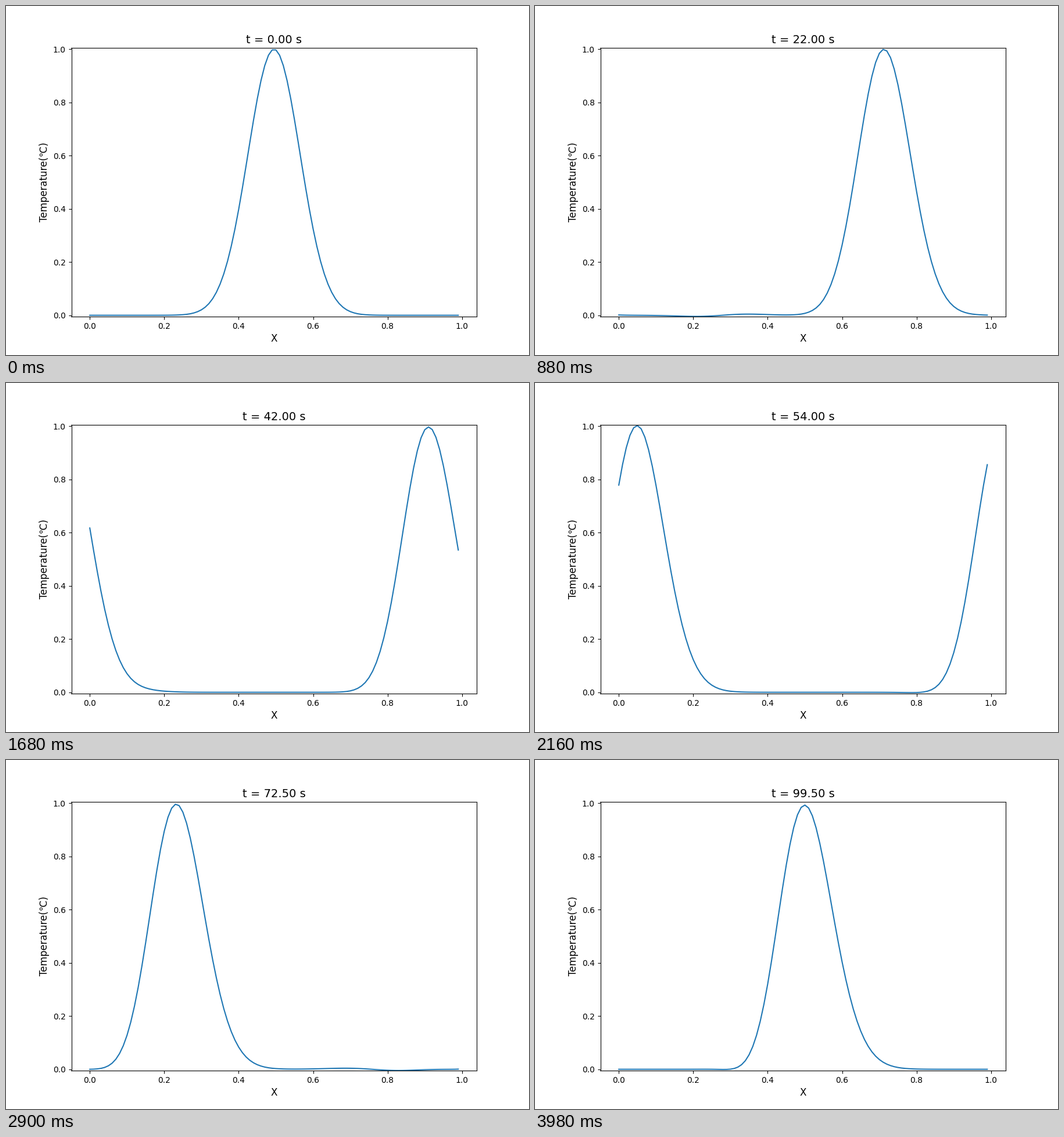
A matplotlib script that plays this animation: 900x600 px, repeating every 4 s.

```python
import numpy as np
import matplotlib.pyplot as plt
from matplotlib.animation import FuncAnimation

plt.rcParams["font.family"] = "DejaVu Sans"

NX = 100            # grid points
DX = 0.01
DT = 0.1            # time step, s
SPEED = 0.01        # advection speed
SKIP = 5            # time steps per frame
FRAMES = 200
INTERVAL = 20       # ms


def solve():
    """Leapfrog advection of a Gaussian pulse with periodic ends."""
    i = np.arange(NX)
    temp = np.zeros((FRAMES * SKIP, NX))
    temp[0] = temp[1] = np.exp(-0.5 * ((i - (NX - 1) / 2) / 7) ** 2)
    courant = SPEED * DT / DX
    for n in range(1, len(temp) - 1):
        cur, new = temp[n], temp[n + 1]
        new[1:-1] = temp[n - 1, 1:-1] - courant * (cur[2:] - cur[:-2])
        new[0], new[-1] = new[-2], new[1]
    return temp[::SKIP]


x = np.arange(NX) * DX
history = solve()

fig, ax = plt.subplots(figsize=(9, 6), dpi=100)
line, = ax.plot(x, history[0], color="#1f77b4", lw=1.5)
ax.set_xlim(-0.0495, 1.0395)
ax.set_ylim(-0.005, 1.005)
ax.set_xlabel("X", fontsize=12)
ax.set_ylabel("Temperature(℃)", fontsize=12)
title = ax.set_title("t = 0.00 s", fontsize=14)


def update(frame):
    line.set_ydata(history[frame])
    title.set_text(f"t = {frame * SKIP * DT:.2f} s")
    return line, title


anim = FuncAnimation(fig, update, frames=FRAMES, interval=INTERVAL,
                     repeat=True, repeat_delay=0, blit=False)
plt.show()
```
